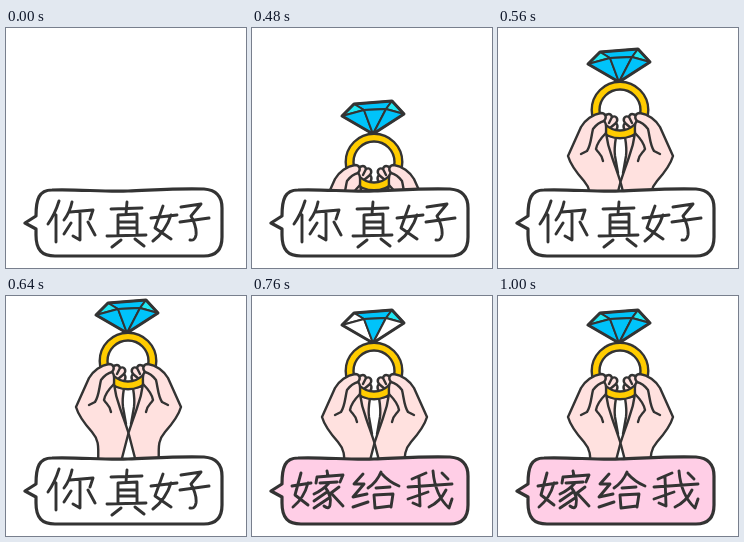
Recreate the animation shown at these times as an HTML page. Size 240x240 px, loop 1.4 s.

```html
<!DOCTYPE html>
<html lang="zh">
<head>
<meta charset="utf-8">
<title>你真好 / 嫁给我</title>
<style>
  html, body { margin: 0; width: 100%; height: 100%; overflow: hidden; background: #fff; }
  svg { display: block; width: 100vw; height: 100vh; }
  .ink { fill: none; stroke: #333; stroke-width: 2.9; stroke-linecap: round; stroke-linejoin: round; }
  .line { stroke: #333; stroke-width: 2.4; stroke-linecap: round; stroke-linejoin: round; }
  .skin { fill: #ffe1df; }
  .open { fill: none; }
  #bubble { fill: #fff; stroke-width: 3.2; }
</style>
</head>
<body>
<svg viewBox="0 0 240 240" role="img" aria-label="你真好,嫁给我">
  <defs>
    <clipPath id="above"><rect width="240" height="195"/></clipPath>
    <g id="backFingers" class="line skin">
      <path d="M106 82 C109 78 113 78 114 82 C118 80 121 84 118 88 C121 91 119 96 115 97 L106 100Z"/>
      <path class="open" d="M114 82 L111 88 M118 88 L112 93"/>
      <path d="M108 100 L118 102 C117 108 116 114 117 121 L120 138 L108 120Z"/>
    </g>
    <g id="hand" class="line skin">
      <path d="M92 176 C93 158 92 153 86 146 C78 137 72 128 70 121 L83 92 C87 85 95 79 103 78 C108 78 109 83 106 86 C109 88 108 94 108 98 C109 106 111 114 114 122 C117 131 120 139 122.5 147 L115 176Z"/>
      <path class="open" d="M106 86 C102 87 98 90 95 94 C93 102 93 110 89 116 L83 119 M108 98 C103 103 99 108 98 114 C100 118 104 119 105 126"/>
    </g>
  </defs>

  <g clip-path="url(#above)">
    <g id="gift">
      <use href="#backFingers"/>
      <use href="#backFingers" transform="matrix(-1 0 0 1 245 0)"/>
      <g id="gem" class="line"></g>
      <g fill="none">
        <circle cx="122" cy="75" r="24.4" stroke="#333" stroke-width="10.2"/>
        <circle cx="122" cy="75" r="24.4" stroke="#fc0" stroke-width="5.4"/>
      </g>
      <use href="#hand"/>
      <use href="#hand" transform="matrix(-1 0 0 1 245 0)"/>
    </g>
  </g>

  <path id="bubble" class="ink" d="M30 188 C30 171 33 162 46 162 C72 161 96 164 122 163 C148 162 174 160 198 161 C211 162 216 169 216 180 V209 C216 222 210 228 198 228 H49 C36 228 30 222 30 207 V201 L19 195Z"/>

  <path id="praise" class="ink" d="M53 173 Q49 186 42 196 M50 187 V214
    M66 174 Q64 184 58 192 M64 184 L87 182 L84 191 M74 184 V212 L67 208 M65 195 L58 206 M82 194 L89 207
    M105 181 L136 180 M121 174 L120 186 M112 207 V187 L131 186 V207 M112 194 H130 M112 200 H130 M101 208 L140 207 M115 212 L106 219 M129 211 L138 218
    M157 178 L149 200 L165 211 M165 187 Q160 203 147 213 M145 190 L171 187
    M175 179 L195 176 L185 188 Q191 199 190 207 Q189 213 184 212 M174 194 L203 190"/>
  <path id="propose" class="ink" d="M49 177 L43 199 L56 209 M56 187 Q52 202 41 211 M40 190 L59 187
    M75 175 L76 180 M64 187 L65 181 L91 179 L88 186 M68 187 L85 186 M77 187 Q71 194 62 198 M73 191 Q80 200 78 209 Q77 214 72 210 M75 196 L62 205 M77 202 L62 212 M87 191 L79 197 L91 210
    M111 178 L102 188 L112 188 L101 201 L115 198 M101 211 L116 206
    M129 176 Q125 186 116 192 M129 177 Q137 186 147 190 M124 192 L138 191 M123 212 L122 199 L141 198 L139 211 M123 212 L139 210
    M174 177 L160 183 M156 191 L200 188 M167 181 L168 210 L161 207 M156 203 L176 196 M181 175 Q183 199 197 212 L200 203 M194 194 Q188 206 177 211 M190 177 L196 183"/>
</svg>
<script>
const LOOP = 1400;
const $ = id => document.getElementById(id);

// Each step is [time, value] and holds until the next one.
function hold(el, prop, steps) {
  const frames = steps.map(([t, v]) => ({ offset: t / LOOP, [prop]: v, easing: 'step-end' }));
  frames.push({ offset: 1, [prop]: steps.at(-1)[1] });
  el.animate(frames, { duration: LOOP, iterations: Infinity });
}

function addShape(tag, attrs) {
  const el = document.createElementNS('http://www.w3.org/2000/svg', tag);
  for (const name in attrs) el.setAttribute(name, attrs[name]);
  $('gem').append(el);
  return el;
}

const BLUE = '#00c3fa', AQUA = '#22e6f2', WHITE = '#fff';
// Facets: points, colour, whether the facet glints.
const facets = [
  ['102,17 140,14 134,22 112,23', BLUE],
  ['102,17 112,23 90,29', AQUA, true],
  ['140,14 152,27 134,22', AQUA],
  ['90,29 112,23 121,47', BLUE, true],
  ['112,23 134,22 121,47', BLUE],
  ['134,22 152,27 121,47', BLUE, true]
];
for (const [points, color, glints] of facets) {
  const facet = addShape('polygon', { points, fill: color, 'stroke-width': 2 });
  if (glints)
    hold(facet, 'fill', [[0, color], [760, WHITE], [840, color], [920, WHITE], [1000, color]]);
}
addShape('path', { d: 'M102 17 L140 14 L152 27 L121 47 L90 29Z', fill: 'none', 'stroke-width': 3 });

// Decelerating rise past the resting place, then rest.
const rise = [[0, 200]];
for (let i = 0; i <= 6; i++)
  rise.push([400 + 40 * i, Math.round(-10 + 155 * (1 - i / 6) ** 2)]);
rise.push([680, 0]);
hold($('gift'), 'transform', rise.map(([t, y]) => [t, `translateY(${y}px)`]));

hold($('bubble'), 'fill', [[0, WHITE], [680, '#ffcee6']]);
hold($('praise'), 'opacity', [[0, 1], [680, 0]]);
hold($('propose'), 'opacity', [[0, 0], [680, 1]]);
</script>
</body>
</html>
```
